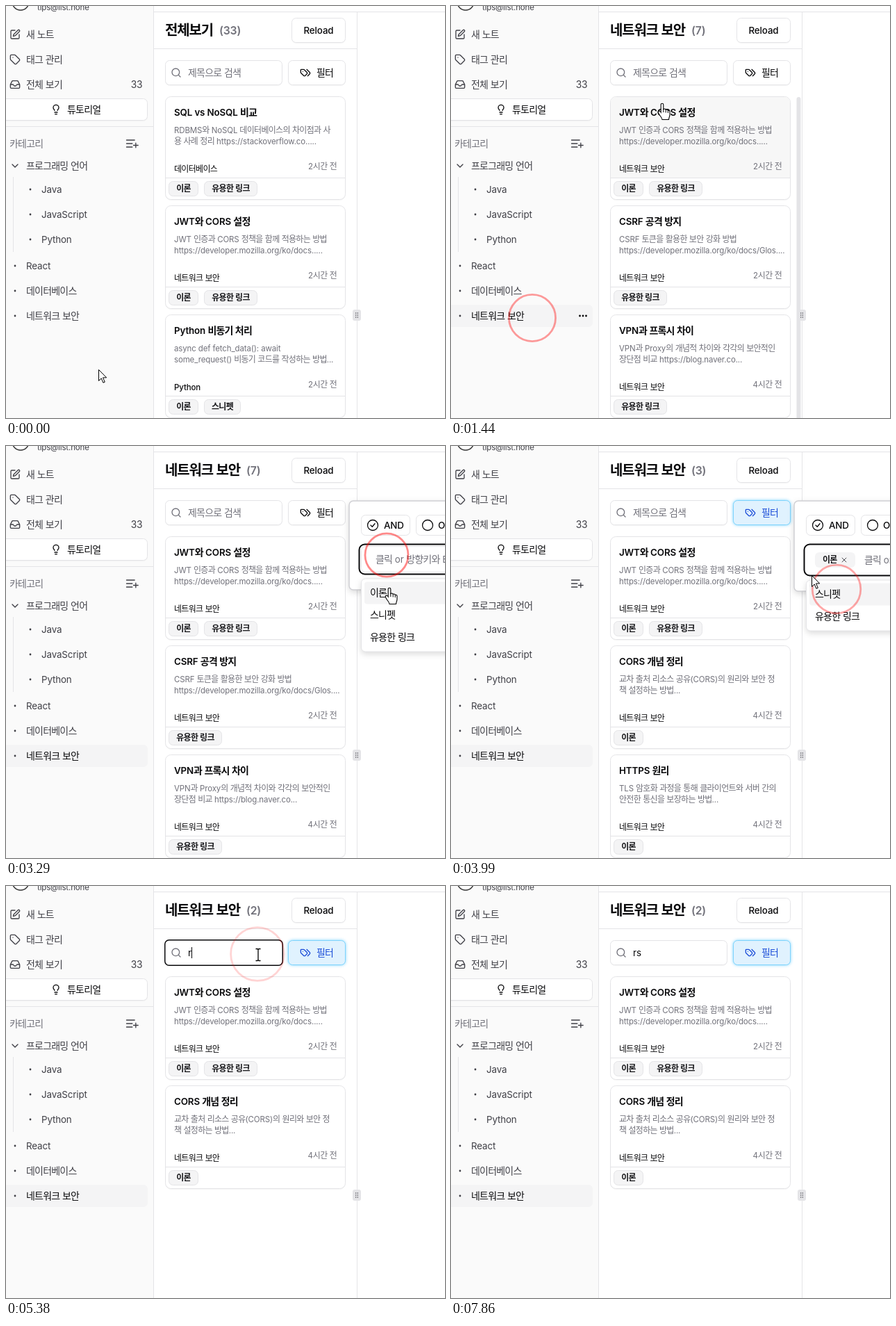
Recreate the animation shown at these times as an HTML page. Size 632 px wide and 593 px high, loop 7990 ms.

```html
<!DOCTYPE html>
<html lang="ko">
<head>
<meta charset="utf-8">
<style>
html, body { margin: 0; width: 100%; height: 100%; overflow: hidden; background: #fff; }
svg { display: block; }
text { font-family: Inter, 'Noto Sans CJK KR', 'Noto Sans CJK', sans-serif; letter-spacing: -.01em; white-space: pre; }
.ko { font-family: 'Noto Sans CJK KR', 'Noto Sans CJK', sans-serif; font-size: 1.047em; letter-spacing: -.056em; }
.icon { fill: none; stroke-linecap: round; stroke-linejoin: round; }
.raised { filter: drop-shadow(0 1px .5px #00000009); }
.floating { filter: drop-shadow(0 3px 4px #00000024); }
.blue { filter: drop-shadow(0 0 2px #7dd3fc); }
</style>
</head>
<body>
<svg id="stage" width="632" height="593" viewBox="0 0 632 593"></svg>
<script>
const LOOP = 7990;
const INK = '#09090b', SOFT = '#3f3f46', GRAY = '#71717a', LINE = '#e4e4e7';

// Drawing helpers
const text = (x, y, str, size = 14, fill = INK, weight = 400, anchor = 'start') =>
  `<text x="${x}" y="${y}" font-size="${size * .955}" fill="${fill}" font-weight="${weight}" text-anchor="${anchor}">` +
  str.replace(/[가-힣]+/g, '<tspan class="ko">$&</tspan>') + '</text>';
const box = (x, y, w, h, r = 6, fill = '#fff', stroke = LINE, extra = '') =>
  `<rect x="${x + .5}" y="${y + .5}" width="${w - 1}" height="${h - 1}" rx="${r}" fill="${fill}" stroke="${stroke}" ${extra}/>`;
const fillBox = (x, y, w, h, fill, r = 0, extra = '') =>
  `<rect x="${x}" y="${y}" width="${w}" height="${h}" rx="${r}" fill="${fill}" ${extra}/>`;
const dot = (x, y, r, fill = SOFT) => `<circle cx="${x}" cy="${y}" r="${r}" fill="${fill}"/>`;
const group = (id, body, extra = '') => `<g id="${id}" ${extra}>${body}</g>`;

const ICONS = {
  pen: 'M12 3H5a2 2 0 0 0-2 2v14a2 2 0 0 0 2 2h14a2 2 0 0 0 2-2v-7M18.4 2.6a1 1 0 0 1 3 3l-9 9L8 16l1-4z',
  tag: 'M12.6 2.6A2 2 0 0 0 11.2 2H4a2 2 0 0 0-2 2v7.2a2 2 0 0 0 .6 1.4l8.7 8.7a2.4 2.4 0 0 0 3.4 0l6.6-6.6a2.4 2.4 0 0 0 0-3.4zM7.5 7.5h.01',
  tags: 'm15 5 6.3 6.3a2.4 2.4 0 0 1 0 3.4L17 19M9.6 5.6A2 2 0 0 0 8.2 5H3a1 1 0 0 0-1 1v5.2a2 2 0 0 0 .6 1.4l5.7 5.7a2.4 2.4 0 0 0 3.4 0l3.6-3.6a2.4 2.4 0 0 0 0-3.4zM6.5 9.5h.01',
  inbox: 'M22 12h-6l-2 3h-4l-2-3H2M5.5 5.1 2 12v6a2 2 0 0 0 2 2h16a2 2 0 0 0 2-2v-6l-3.5-6.9A2 2 0 0 0 16.8 4H7.2a2 2 0 0 0-1.7 1.1z',
  bulb: 'M15 14c.2-1 .7-1.7 1.5-2.5 1-.9 1.5-2.2 1.5-3.5A6 6 0 0 0 6 8c0 1 .2 2.2 1.5 3.5.7.7 1.3 1.5 1.5 2.5M9 18h6M10 22h4',
  chevron: 'm6 9 6 6 6-6',
  search: 'M3 11a8 8 0 1 0 16 0a8 8 0 1 0-16 0M21 21l-4.3-4.3',
  listPlus: 'M13 12H3M17 6H3M13 18H3M19 11v8M23 15h-8',
  circle: 'M2 12a10 10 0 1 0 20 0a10 10 0 1 0-20 0',
  check: 'm8 12 3 3 5-6',
  cross: 'M5 5l14 14M19 5 5 19'
};
const icon = (name, x, y, size = 16, color = SOFT, width = 2) =>
  `<path class="icon" d="${ICONS[name]}" transform="translate(${x} ${y}) scale(${size / 24})" stroke="${color}" stroke-width="${width}"/>`;

// Sidebar
const sidebar = () => {
  const tree = [['Java', 264], ['JavaScript', 300], ['Python', 336]];
  return fillBox(0, 0, 212, 593, '#fafafa') + fillBox(212, 0, 1, 593, LINE) + fillBox(0, 173, 212, 1, LINE) +
    '<circle cx="21" cy="-6" r="12" fill="#fff" stroke="#333" stroke-width="1.5"/>' +
    text(45, 6, 'tips@list.none', 12, SOFT) +
    icon('pen', 5, 33) + text(29, 46, '새 노트', 14, SOFT) +
    icon('tag', 5, 69) + text(29, 82, '태그 관리', 14, SOFT) +
    icon('inbox', 5, 105) + text(29, 118, '전체 보기', 14, SOFT) + text(196.5, 118, '33', 14.5, SOFT, 400, 'end') +
    `<g class="raised">${box(-12, 133, 216, 32)}</g>` + icon('bulb', 64, 141, 16, INK) +
    text(88, 154, '튜토리얼', 14, INK, 500) +
    text(5, 203, '카테고리', 14, GRAY) + icon('listPlus', 171, 188, 20, SOFT, 1.6) +
    icon('chevron', 5, 222, 16) + text(29, 235, '프로그래밍 언어', 14, SOFT) +
    fillBox(10, 246, 1, 108, LINE) +
    tree.map(([s, y]) => dot(35, y, 1.4) + text(51, y + 5, s, 14, SOFT)).join('') +
    [['React', 374], ['데이터베이스', 410]].map(([s, y]) => dot(13, y, 1.4) + text(29, y + 5, s, 14, SOFT)).join('') +
    group('rowBack', fillBox(-8, 430, 212, 32, '#f4f4f5', 6)) +
    dot(13, 446, 1.4) + group('rowText', text(29, 451, '네트워크 보안', 14, 'inherit')) +
    group('rowMore', [185.5, 190, 194.5].map(x => dot(x, 446, 1.4, INK)).join(''));
};

// Note cards
const CARD_TOP = [130, 287, 444];
const TH = '이론', LK = '유용한 링크', NET = '네트워크 보안';
const JWT = ['JWT와 CORS 설정', 'JWT 인증과 CORS 정책을 함께 적용하는 방법', 'https://developer.mozilla.org/ko/docs.....', NET, 2, [TH, LK]];
const LISTS = {
  all: [
    ['SQL vs NoSQL 비교', 'RDBMS와 NoSQL 데이터베이스의 차이점과 사', '용 사례 정리 https://stackoverflow.co.....', '데이터베이스', 2, [TH, LK]],
    JWT,
    ['Python 비동기 처리', 'async def fetch_data(): await', 'some_request() 비동기 코드를 작성하는 방법...', 'Python', 2, [TH, '스니펫']]
  ],
  network: [
    JWT,
    ['CSRF 공격 방지', 'CSRF 토큰을 활용한 보안 강화 방법', 'https://developer.mozilla.org/ko/docs/Glos....', NET, 2, [LK]],
    ['VPN과 프록시 차이', 'VPN과 Proxy의 개념적 차이와 각각의 보안적인', '장단점 비교 https://blog.naver.co...', NET, 4, [LK]]
  ],
  theory: [
    JWT,
    ['CORS 개념 정리', '교차 출처 리소스 공유(CORS)의 원리와 보안 정', '책 설정하는 방법...', NET, 4, [TH]],
    ['HTTPS 원리', 'TLS 암호화 과정을 통해 클라이언트와 서버 간의', '안전한 통신을 보장하는 방법...', NET, 4, [TH]]
  ]
};
const TAG_WIDTH = { [TH]: 43, [LK]: 77, '스니펫': 53 };

const card = ([title, line1, line2, category, hours, tags], top) => {
  let x = 234;
  const chips = tags.map(tag => {
    const w = TAG_WIDTH[tag], out = box(x, top + 122, w, 22, 6, '#f4f4f5') + text(x + w / 2, top + 137, tag, 12, '#18181b', 600, 'middle');
    x += w + 8;
    return out;
  }).join('');
  return text(242, top + 28, title, 14, INK, 600) +
    text(242, top + 53, line1, 12, GRAY) + text(242, top + 69, line2, 12, GRAY) +
    text(242, top + 109, category, 12, INK, 500) +
    text(476, top + 105, hours + '시간 전', 12, GRAY, 400, 'end') + chips;
};
const frame = (top, i) => group('frame' + i,
  `<g class="raised">${box(229, top, 260, 149, 8)}</g>` +
  `<path id="hover${i}" d="M230 ${top + 117}V${top + 9}q0-8 8-8h242q8 0 8 8v${108}z" fill="#f7f7f7"/>` +
  fillBox(230, top + 117, 258, 1, LINE));

const filterButton = (id, color, fill, stroke, cls) => group(id,
  `<g class="${cls}">${box(406, 78, 83, 36, 6, fill, stroke)}</g>` +
  icon('tags', 423, 88, 16, color) + text(447, 101, '필터', 14, color, 500));

const column = () =>
  fillBox(213, 8, 419, 1, LINE) + fillBox(213, 61, 292, 1, LINE) + fillBox(505, 9, 1, 584, LINE) +
  group('titleAll', text(229, 42, '전체보기', 20, INK, 700)) +
  group('titleNet', text(229, 42, NET, 20, INK, 700)) +
  group('count', text(0, 41, '', 16.5, GRAY, 600)) +
  `<g class="raised">${box(411, 17, 78, 36)}</g>` + text(450, 40, 'Reload', 14, INK, 500, 'middle') +
  `<g class="raised">${box(229, 78, 169, 36)}</g>` +
  group('focus', '<rect x="228.75" y="77.75" width="169.5" height="36.5" rx="6" fill="#fff" stroke="#09090b" stroke-width="1.5"/>') +
  icon('search', 237, 88, 16, GRAY) +
  group('hint', text(262, 101, '제목으로 검색', 14, GRAY)) + group('query', text(262, 101, '')) +
  fillBox(0, 88, 1, 16, INK, 0, 'id="caret"') +
  filterButton('filterOff', INK, '#fff', LINE, 'raised') +
  filterButton('filterOn', '#1d4ed8', '#e0f2fe', '#7dd3fc', 'blue') +
  CARD_TOP.map(frame).join('') +
  Object.entries(LISTS).map(([name, cards]) =>
    group(name, cards.map((c, i) => `<g class="c${i}">${card(c, CARD_TOP[i])}</g>`).join(''))).join('') +
  fillBox(497.5, 131, 6, 470, LINE, 3, 'id="scrollbar"') +
  fillBox(499, 437, 12, 16, LINE, 3) +
  [442, 445, 448].map(y => dot(503.7, y, .7, SOFT) + dot(506.3, y, .7, SOFT)).join('');

// Filter popover
const options = (id, y, items) => group(id,
  `<g class="floating">${box(511, y, 160, items.length * 32 + 10)}</g>` + fillBox(516, y + 5, 150, 32, '#f4f4f5', 4) +
  items.map((s, i) => text(524, y + 25 + i * 32, s)).join(''));
const focusRing = h => `<rect x="508.5" y="141.5" width="160" height="${h}" rx="8" fill="#fff" stroke="#09090b" stroke-width="2"/>`;
const HINT = '클릭 or 방향키와 Enter';
const popover = () => group('popover',
  '<g class="floating"><rect id="panel" x="494" y="79" width="200" rx="6" fill="#fff" stroke="#d0d0d4" stroke-width="1.5"/></g>' +
  box(511, 99, 71, 30) + icon('circle', 519, 105, 18, INK, 1.7) + icon('check', 519, 105, 18, INK, 1.8) + text(544, 119, 'AND', 14, INK, 500) +
  box(590, 99, 65, 30) + icon('circle', 598, 105, 18, INK, 1.7) + text(622, 119, 'OR', 14, INK, 500) +
  group('ringEmpty', focusRing(43)) + group('ringChip', focusRing(45)) +
  group('field', box(511, 144, 160, 38)) +
  group('fieldHint', text(532, 168, HINT, 14, GRAY)) +
  group('chip', fillBox(524, 153, 58, 22, '#f4f4f5', 6) + text(535, 168, TH, 12, '#18181b', 600) + icon('cross', 561, 159, 10, SOFT, 2.2) +
    text(595, 169, HINT, 14, GRAY)) +
  options('options3', 190.5, [TH, '스니펫', LK]) + options('options2', 192.5, ['스니펫', LK]));

const POINTERS = {
  arrow: '<path d="M.5.5v16l3.7-3.6 2.7 6.3 2.4-1-2.8-6.3h5.2z" fill="#fff" stroke="#000" stroke-linejoin="round"/>',
  hand: '<g transform="translate(1 0)"><path d="M-1.8 2a1.8 1.8 0 0 1 3.6 0v6.5c2-1 3.2-.2 3.4.8 1.6-.7 2.9 0 3.1 1 1.7-.4 2.7.4 2.7 2v4.2c0 3-1.5 4-1.5 7h-9.5c0-2.5-2.6-4.6-4.3-7.6-1.2-2-2.2-3-1.2-4.2 1.2-1.2 2.8-.2 3.7 1.3z" fill="#fff" stroke="#000" stroke-width="1.1"/>' +
    '<path d="M1.8 8v5M5.2 9.5v4M8.3 10.5v3.5" stroke="#000" fill="none"/></g>',
  beam: '<path d="M-3.5-7.5h2.5l1 1 1-1h2.5M0-6.5v15M-3.5 9.5h2.5l1-1 1 1h2.5" fill="none" stroke="#000" stroke-width="1.3"/>'
};

document.getElementById('stage').innerHTML = sidebar() + column() + popover() +
  '<circle id="ring" fill="none" stroke="#f00" stroke-width="2.8"/>' +
  group('pointer', Object.entries(POINTERS).map(([id, body]) => group(id, body)).join(''));

// Timeline
const MOVES = [
  [190, 133, 523], [620, 117, 444], [770, 117, 444], [950, 117, 449], [1080, 117, 449], [1440, 303, 140],
  [1960, 430, 93], [2130, 430, 93], [2370, 482, 136], [2780, 548, 157], [3010, 548, 157], [3290, 551, 204],
  [3420, 555, 206], [3720, 555, 206], [4700, 363, 98], [6040, 363, 98], [6420, 364, 212],
  [6760, 362, 330], [7330, 362, 330], [7830, 562, -2], [7860, 575, -40]
];
const CLICKS = [[982, 117, 449], [2063, 430, 93], [2888, 548, 157], [3500, 555, 206], [4757, 362, 98]];
const RING_LIFE = 750, RING_MAX = 39.5;
const NET_AT = 1110, OPEN_AT = 2150, FIELD_AT = 2960, PICK_AT = 3620, CLOSE_AT = 4840;
const KEY_R = 5280, KEY_S = 5520, BLUR_AT = 7800, BLINK = 530;

const $ = id => document.getElementById(id);
const show = (id, on) => { $(id).style.display = on ? '' : 'none'; };
const between = (t, a, b) => t >= a && t < b;
const smooth = p => p * p * (3 - 2 * p);

function pointerAt(t) {
  const i = MOVES.findIndex(m => m[0] > t);
  if (i === 0) return MOVES[0].slice(1);
  if (i < 0) return MOVES[MOVES.length - 1].slice(1);
  const [t0, x0, y0] = MOVES[i - 1], [t1, x1, y1] = MOVES[i];
  const p = smooth((t - t0) / (t1 - t0));
  return [Math.round(x0 + (x1 - x0) * p), Math.round(y0 + (y1 - y0) * p)];
}

function render(t) {
  const [x, y] = pointerAt(t);
  const inside = (l, top, r, b) => x >= l && x <= r && y >= top && y <= b;
  const open = between(t, OPEN_AT, CLOSE_AT), picked = t >= PICK_AT;
  const onRow = inside(0, 430, 204, 462);
  const cards = t < KEY_R ? 3 : 2;
  const hovered = CARD_TOP.findIndex((top, i) => i < cards && inside(229, top, 489, top + 148));

  $('rowText').setAttribute('fill', onRow || t >= NET_AT ? INK : SOFT);
  $('rowText').firstChild.setAttribute('fill', onRow || t >= NET_AT ? INK : SOFT);
  show('rowBack', onRow || t >= NET_AT);
  show('rowMore', onRow || between(t, 982, 1600));

  const list = t < NET_AT ? 'all' : picked ? 'theory' : 'network';
  for (const name in LISTS) show(name, name === list);
  show('titleAll', t < NET_AT);
  show('titleNet', t >= NET_AT);
  const count = $('count').firstChild;
  count.setAttribute('x', t < NET_AT ? 307 : 346);
  count.textContent = `(${t < NET_AT ? 33 : !picked ? 7 : t < KEY_R ? 3 : 2})`;
  CARD_TOP.forEach((_, i) => {
    show('frame' + i, i < cards);
    show('hover' + i, i === hovered);
  });
  document.querySelector('#theory .c2').style.display = cards > 2 ? '' : 'none';
  show('scrollbar', between(t, 1250, 2000));

  const focused = between(t, 4800, BLUR_AT);
  const blinkOn = t < KEY_S || Math.floor((t - KEY_S) / BLINK) % 2 === 0;
  show('focus', focused);
  show('caret', focused && blinkOn);
  $('caret').setAttribute('x', t < KEY_R ? 262 : t < KEY_S ? 267 : 273);
  show('hint', t < KEY_R);
  $('query').firstChild.textContent = t < KEY_R ? '' : t < KEY_S ? 'r' : 'rs';
  show('filterOff', !picked);
  show('filterOn', picked);

  show('popover', open);
  $('popover').style.opacity = Math.min(1, (t - OPEN_AT) / 80 + .3);
  $('panel').setAttribute('height', picked ? 130 : 128);
  const active = t >= FIELD_AT;
  show('ringEmpty', active && !picked);
  show('ringChip', picked);
  show('field', !picked);
  show('fieldHint', !picked);
  show('chip', picked);
  show('options3', active && !picked);
  show('options2', picked);

  const click = CLICKS.find(c => between(t, c[0], c[0] + RING_LIFE));
  show('ring', click);
  if (click) {
    const p = (t - click[0]) / RING_LIFE, ring = $('ring');
    ring.setAttribute('cx', click[1]);
    ring.setAttribute('cy', click[2]);
    ring.setAttribute('r', RING_MAX * (1 - (1 - p) ** 2));
    ring.setAttribute('opacity', 1 - p);
  }

  const onInput = inside(229, 78, 398, 114) || (open && inside(511, 144, 632, 184));
  const onButton = inside(406, 78, 489, 116) || (open && active && inside(511, 191, 632, 296));
  const kind = onInput ? 'beam' : onRow || onButton || hovered >= 0 ? 'hand' : 'arrow';
  for (const name in POINTERS) show(name, name === kind);
  $('pointer').setAttribute('transform', `translate(${x} ${y})`);
}

const start = performance.now();
function tick() {
  render((performance.now() - start) % LOOP);
  requestAnimationFrame(tick);
}
tick();
</script>
</body>
</html>
```
